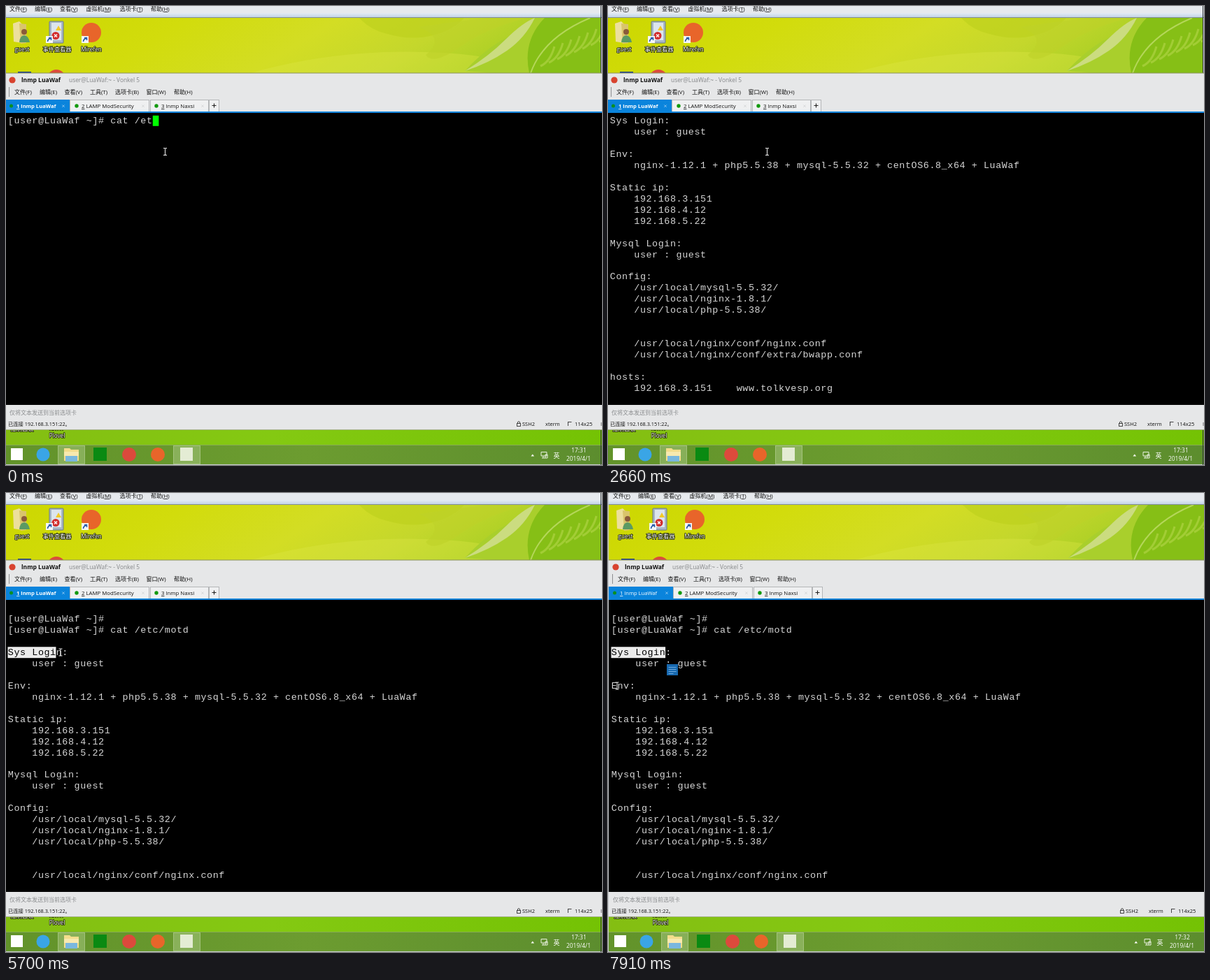
These frames come from a looping animation (852 by 657 pixels, 8 s). An HTML page:

```html
<!DOCTYPE html>
<html lang="zh">
<head>
<meta charset="utf-8">
<title>Terminal session</title>
<style>
html, body { margin: 0; width: 100%; height: 100%; overflow: hidden; background: #c9cdd1; }
svg { display: block; width: 852px; height: 657px; }
text { font-family: "Open Sans", "Noto Sans CJK SC", "Noto Sans CJK", sans-serif; white-space: pre; }
.u { text-decoration: underline; }
#term text { font: 13.4px "Liberation Mono", monospace; letter-spacing: .58px; fill: #d6d6d6; }
.label { fill: #fff; font-size: 8.2px; text-anchor: middle; paint-order: stroke; stroke: #1c2400; stroke-width: 1.6px; stroke-linejoin: round; }
</style>
</head>
<body>
<svg id="stage" viewBox="0 0 852 657">
  <defs>
    <linearGradient id="sky" x2="1" y2=".15">
      <stop offset="0" stop-color="#ccd700"/><stop offset=".3" stop-color="#d2dc0c"/>
      <stop offset=".55" stop-color="#d3dd24"/><stop offset=".75" stop-color="#c4d72c"/>
      <stop offset="1" stop-color="#9fcc22"/>
    </linearGradient>
    <linearGradient id="grass">
      <stop offset="0" stop-color="#84be12"/><stop offset=".45" stop-color="#84c912"/>
      <stop offset="1" stop-color="#74c204"/>
    </linearGradient>
    <linearGradient id="bar">
      <stop offset="0" stop-color="#62932a"/><stop offset=".5" stop-color="#6c9c30"/>
      <stop offset="1" stop-color="#5c8d2e"/>
    </linearGradient>
    <linearGradient id="glass" x2="0" y2="1">
      <stop offset="0" stop-color="#e3ebf4"/><stop offset="1" stop-color="#c4d4e6"/>
    </linearGradient>
    <clipPath id="paper"><path d="M-1 17H850V96H-1z"/></clipPath>
    <clipPath id="strip"><path d="M-1 607H850V628H-1z"/></clipPath>
  </defs>
  <g id="view">
    <g id="desk"></g>
    <g id="win"></g>
    <g id="term"></g>
    <g id="popup">
      <rect x="82" y="245" width="16" height="16" fill="#1769b0"/>
      <path d="M84.500 249.500h11M84.500 252.500h11M84.500 255.500h11M84.500 258.500h7" stroke="#6fa9dc"/>
    </g>
  </g>
  <g id="mouse">
    <path id="beam" d="M-2.500-5H-.8L0-4.300.8-5H2.500M0-4.300V4.300M-2.500 5H-.8L0 4.300.8 5H2.500" fill="none" stroke="#e8e8e8" stroke-width="1.100"/>
    <path id="arrow" d="M0 0V11.500L2.700 9.200 4.400 13 6.200 12.200 4.500 8.500H8z" fill="#fff" stroke="#222" stroke-width=".5"/>
  </g>
</svg>
<script>
const LOOP = 8000, COL = 8.62, ROW = 15.94, LEFT = 2.5, TOP = 156, ROWS = 25;
const $ = id => document.getElementById(id);

const rect = (x, y, w, h, fill, more = '') =>
  `<rect x="${x}" y="${y}" width="${w}" height="${h}" fill="${fill}" ${more}/>`;
const band = (y, h, fill) => rect(-1, y, 853, h, fill);
const disc = (x, y, r, fill) => `<circle cx="${x}" cy="${y}" r="${r}" fill="${fill}"/>`;
const path = (d, fill, more = '') => `<path d="${d}" fill="${fill}" ${more}/>`;
const line = (d, color, width = 1) => path(d, 'none', `stroke="${color}" stroke-width="${width}"`);
const text = (x, y, str, size = 8, fill = '#111', more = '') =>
  `<text x="${x}" y="${y}" font-size="${size}" fill="${fill}" ${more}>${str}</text>`;
const label = (x, y, str) => `<text class="label" x="${x}" y="${y}">${str}</text>`;
const key = c => `<tspan class="u">${c}</tspan>`;
const menu = (y, items, mark) => items.map(([x, name, c]) =>
  text(x, y, `${name}(${mark ? key(c) : c})`)).join('');
const shortcut = (x, y) => rect(x, y, 10, 10, '#f4f6f8') +
  line(`M${x + 2.5} ${y + 8}C${x + 2.5} ${y + 4} ${x + 5} ${y + 4} ${x + 7} ${y + 3}M${x + 4} ${y + 2.5}h3.500v3.500`, '#2358a8', 1.5);

function wallpaper() {
  let ribs = '';
  for (let i = 0; i < 8; i++) {
    const x = 764 + i * 12;
    ribs += `M${x} ${86 - i * 5}Q${x + 14} ${80 - i * 5} ${x + 20} ${58 - i * 5}`;
  }
  return `<g clip-path="url(#paper)">` +
    band(17, 79, 'url(#sky)') +
    path('M350 96Q470 62 600 66T700 96z', '#dde445', 'opacity=".35"') +
    path('M505 17H655Q640 34 610 42T545 40Q520 34 505 17z', '#bcd11c', 'opacity=".6"') +
    path('M590 30Q640 22 690 17H745Q690 30 650 58T600 70Q630 46 590 30z', '#bfd329', 'opacity=".6"') +
    path('M656 93Q684 62 716 45T756 17H850V96H700z', '#a9cf2c') +
    path('M656 93Q690 72 714 48T756 17Q742 46 716 64T656 93z', '#cbdc80') +
    path('M748 96Q738 50 770 17H850V96z', '#86bf16') +
    line(ribs, '#a2cd35', 3) +
    line('M750 96Q768 45 835 17', '#b5d75a', 2) +
    '</g>';
}

function desktop() {
  return band(0, 11, '#e6e9ed') + band(10, 6, 'url(#glass)') + band(16, 1, '#7f8c98') +
    wallpaper() +
    menu(7, [[5, '文件', 'F'], [41, '编辑', 'E'], [77, '查看', 'V'], [114.5, '虚拟机', 'M'], [162.5, '选项卡', 'T'], [207, '帮助', 'H']], true) +
    path('M10 25l9-3 4 4v27l-12-2z', '#ecdf9c') + path('M19 25l10 1v27l-8 1z', '#d9c46c') +
    disc(26, 37, 4, '#8a5a3a') + path('M19 52q1-10 7-10t8 10z', '#5b9a63') + label(23, 65, 'guest') +
    rect(62, 22, 20, 31, '#a9b7c6', 'rx="1" stroke="#66788c"') + rect(65, 24, 14, 25, '#dce5ee') +
    path('M75 28l4 7h-8z', '#f2c928') + disc(71, 42.5, 5.5, '#d22e2e') + line('M69 40.500l4 4m0-4l-4 4', '#fff', 1.4) +
    shortcut(57, 43) + label(73, 65, '事件查看器') +
    disc(122, 38, 14, '#e8652a') + shortcut(108, 43) + label(122, 65, 'Mirefen') +
    rect(17, 94, 19, 3, '#1f3f8c') + disc(72, 104, 13, '#dc4a3c') +
    band(607, 22, 'url(#grass)') +
    `<g clip-path="url(#strip)">${label(23, 607.5, '控制面板')}${label(72, 607, 'Tavlor')}</g>` + label(73, 618, 'Plovel') +
    taskbar() + rect(850, 0, 1, 657, '#34383a');
}

function taskbar() {
  const lit = x => rect(x + .5, 629.5, 38, 26, '#a9c985', 'fill-opacity=".5" stroke="#b5d193" stroke-opacity=".7"');
  return band(628, 28, 'url(#bar)') + band(628, 1, '#86ad52') + band(656, 1, '#c9cdd1') +
    rect(7, 633, 17, 17, '#fff') + disc(53, 642, 9.5, '#3aa5e6') +
    lit(74) + path('M83 633h8l2 2h11v16H83z', '#f3dd8b') + rect(85, 643, 17, 9, '#79b7de') + rect(83, 638, 21, 6, '#f8e9ae') +
    rect(125, 632, 19, 19, '#0a8a12') + disc(176, 642, 10, '#dc4a3c') + disc(217, 642, 10, '#e8652a') +
    lit(239) + rect(249, 632, 18, 19, '#e4ecd4') +
    path('M750.500 644.500l2.300-3 2.300 3z', '#fff') +
    line('M765 638.500h8v5.500h-8zM768 644v3m-2 0h5M771 642h3v5h-3z', '#e9f0df') +
    text(782.5, 646.5, '英', 9, '#fff') +
    `<text id="clock" x="819" y="639" font-size="8.4" fill="#fff" text-anchor="middle"></text>` +
    text(818.5, 651, '2019/4/1', 8.4, '#fff', 'text-anchor="middle"');
}

function windowFrame() {
  const tab = (x, w) => rect(x + .5, 134.5, w, 17, '#eff0f1', 'stroke="#b4b6b8"');
  const x = (cx, c) => line(`M${cx - 1.7} 141.500l3.400 3.400m0-3.400l-3.400 3.400`, c, .8);
  return band(96, 511, '#e6e7e8') + band(95.5, 1, '#8b9360') +
    disc(9, 106, 4.6, '#d8432f') +
    text(22, 109, 'lnmp LuaWaf', 8.5, '#111', 'font-weight="700"') +
    text(90, 109, 'user@LuaWaf:~ - Vonkel 5', 8.4, '#858789') +
    line('M4.500 116v14', '#8d8f91') +
    menu(126, [[12, '文件', 'F'], [48, '编辑', 'E'], [83.5, '查看', 'V'], [120, '工具', 'T'], [156, '选项卡', 'B'], [200.5, '窗口', 'W'], [240, '帮助', 'H']]) +
    rect(-1, 134, 92, 18, '#0a84dc') + disc(7.5, 143, 2.5, '#0b8f22') +
    `<text id="tab" x="15" y="146" font-size="7.6" fill="#fff">${key(1)} lnmp LuaWaf</text>` + x(82, '#a8d2f2') +
    tab(91, 113) + disc(101, 143, 2.7, '#12990f') + text(108, 146, key(2) + ' LAMP ModSecurity', 7.8) + x(196, '#d0d2d4') +
    tab(206, 83) + disc(215, 143, 2.7, '#12990f') + text(222, 146, key(3) + ' lnmp Naxsi', 7.8) + x(281, '#d0d2d4') +
    tab(290, 14) + line('M294.500 142.500h6m-3-3v6', '#222', 1.1) +
    band(151, 2, '#0a84dc') + band(153, 418, '#000') +
    text(5, 584.5, '仅将文本发送到当前选项卡', 8, '#8b8d8f') +
    text(3, 601, '已连接 192.168.3.151:22。', 7.3) +
    rect(730.5, 597.5, 5, 4, 'none', 'stroke="#333" stroke-width=".9"') + line('M731.500 597v-1.500q1.500-2 3 0v1.500', '#333', .9) +
    text(738, 601, 'SSH2', 7.5) + text(771, 601, 'xterm', 7.5) +
    line('M803.500 595v6m0-5.500h5', '#333', .9) + text(813, 601, '114x25', 7.5) +
    rect(850.5, 596, 1, 5, '#777') + band(606, 1, '#a9b38f');
}

const PROMPT = '[user@LuaWaf ~]# ';
const BUFFER = `
${PROMPT}
${PROMPT}cat /etc/motd

Sys Login:
    user : guest

Env:
    nginx-1.12.1 + php5.5.38 + mysql-5.5.32 + centOS6.8_x64 + LuaWaf

Static ip:
    192.168.3.151
    192.168.4.12
    192.168.5.22

Mysql Login:
    user : guest

Config:
    /usr/local/mysql-5.5.32/
    /usr/local/nginx-1.8.1/
    /usr/local/php-5.5.38/


    /usr/local/nginx/conf/nginx.conf
    /usr/local/nginx/conf/extra/bwapp.conf

hosts:
    192.168.3.151    www.tolkvesp.org

web:
    http://www.tolkvesp.org/


${PROMPT}`.split('\n');

// Each step changes only the named parts; top is the first buffer line in view.
const at = (x, y) => ({ x, y });
const STEPS = [
  [0, { typed: 'cat /et', top: -1, sel: 0, pop: false, arrow: false, dx: 0, bold: 700, clock: '17:31', ...at(227.5, 208.5) }],
  [150, { typed: 'cat /etc' }], [370, { typed: 'cat /etc/m' }], [520, { typed: 'cat /etc/mot' }],
  [1200, { typed: 'cat /etc/motd' }], [1350, { top: 10 }],
  [2510, { top: 7 }], [2660, { top: 4 }], [2810, { top: 1 }], [2960, { top: 0 }],
  [3110, at(165, 226)], [3270, at(100, 244)], [3420, at(84, 250)], [3540, at(66, 256)],
  [3660, at(44, 261)], [3810, at(21, 262)], [3930, at(30, 252)], [4060, at(58, 246)],
  [4190, at(88, 244)], [4320, at(116, 244)], [4460, at(140, 245)], [4590, at(154, 246)],
  [4740, at(120, 240)], [4890, at(66, 233)], [5020, at(22, 229)], [5150, at(4, 228)],
  [5290, { sel: 1, ...at(13, 228) }], [5430, { sel: 3, ...at(33, 228) }],
  [5570, { sel: 6, ...at(58, 228) }], [5700, { sel: 8, ...at(78, 228) }],
  [5850, { sel: 9, ...at(83, 229) }], [6010, { pop: true, ...at(78, 236) }], [6160, at(54, 252)],
  [6310, at(28, 267)], [6470, at(8, 275)],
  [6630, { arrow: true, dx: -1.4, bold: 400, ...at(-1.5, 274.5) }],
  [7060, { dx: -.4 }], [7210, { dx: .8 }], [7330, { dx: 1.3 }], [7490, { dx: 2, clock: '17:32' }],
  [7760, { arrow: false, ...at(5, 278) }], [7910, at(13, 276)]
];

function terminal({ top, typed, sel }) {
  const live = top < 0, first = live ? 0 : top;
  const rows = live ? [PROMPT + typed] : BUFFER.slice(first, first + ROWS);
  const last = live ? 0 : BUFFER.length - 1 - first;
  let out = '';
  if (last < ROWS) out += rect(LEFT + rows[last].length * COL + .4, TOP + last * ROW + .8, 8.6, 15, '#0f0');
  rows.forEach((row, i) => {
    const y = TOP + i * ROW, n = first + i === 4 && !live ? sel : 0;
    if (n) out += rect(LEFT, y + .5, n * COL, ROW, '#ececec');
    const body = n ? `<tspan fill="#000">${row.slice(0, n)}</tspan>${row.slice(n)}` : row;
    if (row) out += `<text x="${LEFT + .3}" y="${y + 12.3}">${body}</text>`;
  });
  return out;
}

$('desk').innerHTML = desktop();
$('win').innerHTML = windowFrame();

let shown = -1;
function draw(now) {
  const t = now % LOOP;
  const n = STEPS.filter(step => step[0] <= t).length;
  if (n !== shown) {
    shown = n;
    const s = Object.assign({}, ...STEPS.slice(0, n).map(step => step[1]));
    $('term').innerHTML = terminal(s);
    $('view').setAttribute('transform', `translate(${s.dx})`);
    $('mouse').setAttribute('transform', `translate(${s.x} ${s.y})`);
    $('popup').style.display = s.pop ? '' : 'none';
    $('arrow').style.display = s.arrow ? '' : 'none';
    $('beam').style.display = s.arrow ? 'none' : '';
    $('tab').setAttribute('font-weight', s.bold);
    $('clock').textContent = s.clock;
  }
  requestAnimationFrame(draw);
}
draw(performance.now());
</script>
</body>
</html>
```
